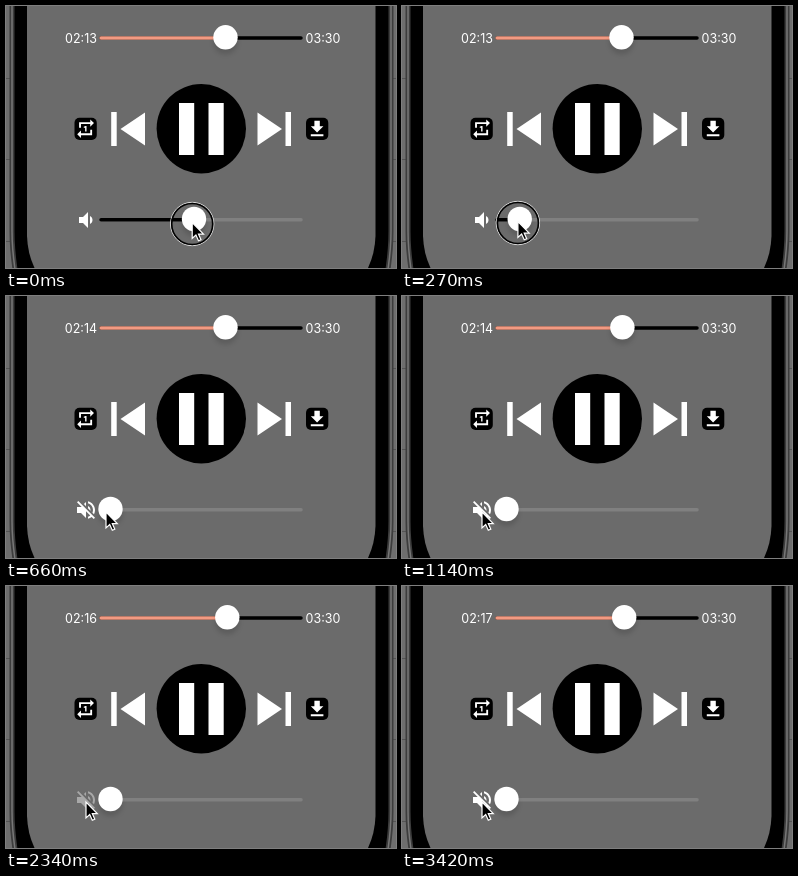
These frames come from a looping animation (390x262 px, 3600 ms). An HTML page:

```html
<!DOCTYPE html>
<html lang="en">
<head>
<meta charset="utf-8">
<title>Audio player</title>
<style>
  html, body { margin: 0; width: 100%; height: 100%; overflow: hidden; background: #6e6e6e; }
  svg { display: block; width: 390px; height: 262px; }
  text { font: 12.5px Inter, "Liberation Sans", sans-serif; fill: #fff; text-anchor: middle; }
  .thumb { fill: #fff; filter: drop-shadow(0 5px 2px rgba(0, 0, 0, .13)); }
  .track { stroke-width: 3.5; stroke-linecap: round; }
</style>
</head>
<body>
<svg viewBox="0 0 390 262">
  <defs>
    <path id="body" d="M6 -9V225Q6 245 10 270H381Q385 245 385 225V-9Z"/>
  </defs>

  <!-- phone -->
  <path d="M0 72.5H390M0 153.5H390M0 235.5H390" stroke="#555"/>
  <use href="#body" stroke="#3c3c3c" stroke-width="5"/>
  <use href="#body" fill="none" stroke="#777" stroke-width="1.5"/>
  <path d="M21 0V230Q21.5 247 28.5 262H362Q369 247 369.5 230V0Z" fill="#6b6b6b"/>

  <!-- progress -->
  <text id="clock" x="75" y="36.8"></text>
  <text x="317" y="36.8">03:30</text>
  <path class="track" d="M95 32H295" stroke="#000"/>
  <path class="track" id="played" stroke="#f29a82"/>
  <circle class="thumb" id="seek" cy="31.3" r="12.2"/>

  <!-- transport -->
  <circle cx="195.3" cy="122.7" r="44.7"/>
  <g fill="#fff">
    <path d="M173 97h15.2v52h-15.2zM202.5 97h15.2v52h-15.2z"/>
    <path d="M105.2 106h5.5v34h-5.5zM139 106.5v33L114.5 123z"/>
    <path d="M279.5 106h5.5v34h-5.5zM251.5 106.5v33L276 123z"/>
  </g>
  <rect x="68.5" y="111.7" width="22.3" height="22.3" rx="5"/>
  <rect x="300" y="111.7" width="22.3" height="22.3" rx="5"/>
  <g fill="#fff">
    <path transform="translate(79.6 122.7) scale(.93) translate(-12 -12)" d="M13 15V9H12L10 10V11H11.5V15M17 17H7V14L3 18L7 22V19H19V13H17M7 7H17V10L21 6L17 2V5H5V11H7V7Z"/>
    <path transform="translate(311.1 122.5) scale(.9) translate(-12 -11.5)" d="M5 20H19V18H5M19 9H15V3H9V9H5L12 16Z"/>
    <path id="sound" transform="translate(68 202)" d="M5 9V15H9L14 20V4L9 9M18.5 12C18.5 10.2 17.5 8.7 16 8V16C17.5 15.3 18.5 13.8 18.5 12Z"/>
    <path id="muted" transform="translate(68 202)" d="M12 4L9.9 6.1L12 8.2M4.3 3L3 4.3L7.7 9H3V15H7L12 20V13.3L16.25 17.5C15.6 18 14.8 18.5 14 18.7V20.8C15.4 20.45 16.6 19.8 17.7 19L19.7 21L21 19.7L12 10.7M19 12C19 12.9 18.8 13.8 18.45 14.65L20 16.15C20.6 14.9 21 13.5 21 12C21 7.7 18 4.15 14 3.2V5.3C16.9 6.15 19 8.8 19 12M16.5 12C16.5 10.2 15.5 8.7 14 8V10.2L16.45 12.65Z"/>
  </g>

  <!-- volume -->
  <path class="track" d="M95 213.7H295" stroke="#808080"/>
  <path class="track" id="level" stroke="#000"/>
  <circle class="thumb" id="volume" cy="213" r="12.2"/>

  <!-- pointer -->
  <g id="pointer">
    <g id="ring" fill="none">
      <circle cy="1.5" r="21.7" stroke="#ddd"/>
      <circle cy="1.5" r="20.5" stroke="#000" stroke-width="1.6"/>
    </g>
    <path d="M0 0V16L3.7 12.6L6.3 18.3L8.8 17.2L6.3 11.6H11.3Z" stroke="#fff" stroke-width="1.2"/>
  </g>
</svg>
<script>
const LOOP = 3600;
const $ = id => document.getElementById(id);
const set = (id, name, value) => $(id).setAttribute(name, value);
const clamp = (v, lo = 0, hi = 1) => Math.min(hi, Math.max(lo, v));
const ease = p => p < .5 ? 2 * p * p : 1 - 2 * (1 - p) ** 2;
const countPast = (times, t) => times.filter(at => t >= at).length;

// pointer path: [time, x, y]
const path = [
  [0, 186.5, 216.5], [150, 141.8, 215.5], [270, 116, 215.5], [420, 103.5, 215.5],
  [540, 100, 216], [810, 100, 216], [960, 86, 216.5], [1140, 80, 216], [LOOP, 80, 216]
];
const presses = [[1200, 1740], [2100, 2520], [2910, 3420]];
const clockTicks = [660, 1500, 2340, 3180];
const seekTicks = [840, 1740, 2640];

function pointerAt(t) {
  const i = path.findIndex(p => p[0] > t);
  const [t0, x0, y0] = path[i - 1], [t1, x1, y1] = path[i];
  const k = (t - t0) / (t1 - t0);
  return [x0 + (x1 - x0) * k, y0 + (y1 - y0) * k];
}

// dims for 150 ms, then recovers over the last 250 ms
function iconOpacity(t) {
  const dim = ([, end]) => ease(clamp((t - end + 400) / 150)) - ease(clamp((t - end + 250) / 250));
  return 1 - .7 * Math.max(...presses.map(dim));
}

function draw(t) {
  const [x, y] = pointerAt(t);
  const volume = Math.max(104.5, x + 1.8);
  const seek = 219.5 + .9 * countPast(seekTicks, t);
  const silent = volume < 107;
  const pressed = t < 630 || presses.some(([start]) => t >= start && t < start + 150);

  $("clock").textContent = "02:" + (13 + countPast(clockTicks, t));
  set("played", "d", `M95 32H${seek}`);
  set("seek", "cx", seek);
  set("level", "d", `M95 213.7H${volume}`);
  set("level", "visibility", silent ? "hidden" : "visible");
  set("volume", "cx", volume);
  set("sound", "visibility", silent ? "hidden" : "visible");
  set("muted", "visibility", silent ? "visible" : "hidden");
  set("muted", "opacity", iconOpacity(t));
  set("ring", "visibility", pressed ? "visible" : "hidden");
  set("pointer", "transform", `translate(${x} ${y})`);
}

const begin = performance.now();
function frame() {
  draw((performance.now() - begin) % LOOP);
  requestAnimationFrame(frame);
}
frame();
</script>
</body>
</html>
```
